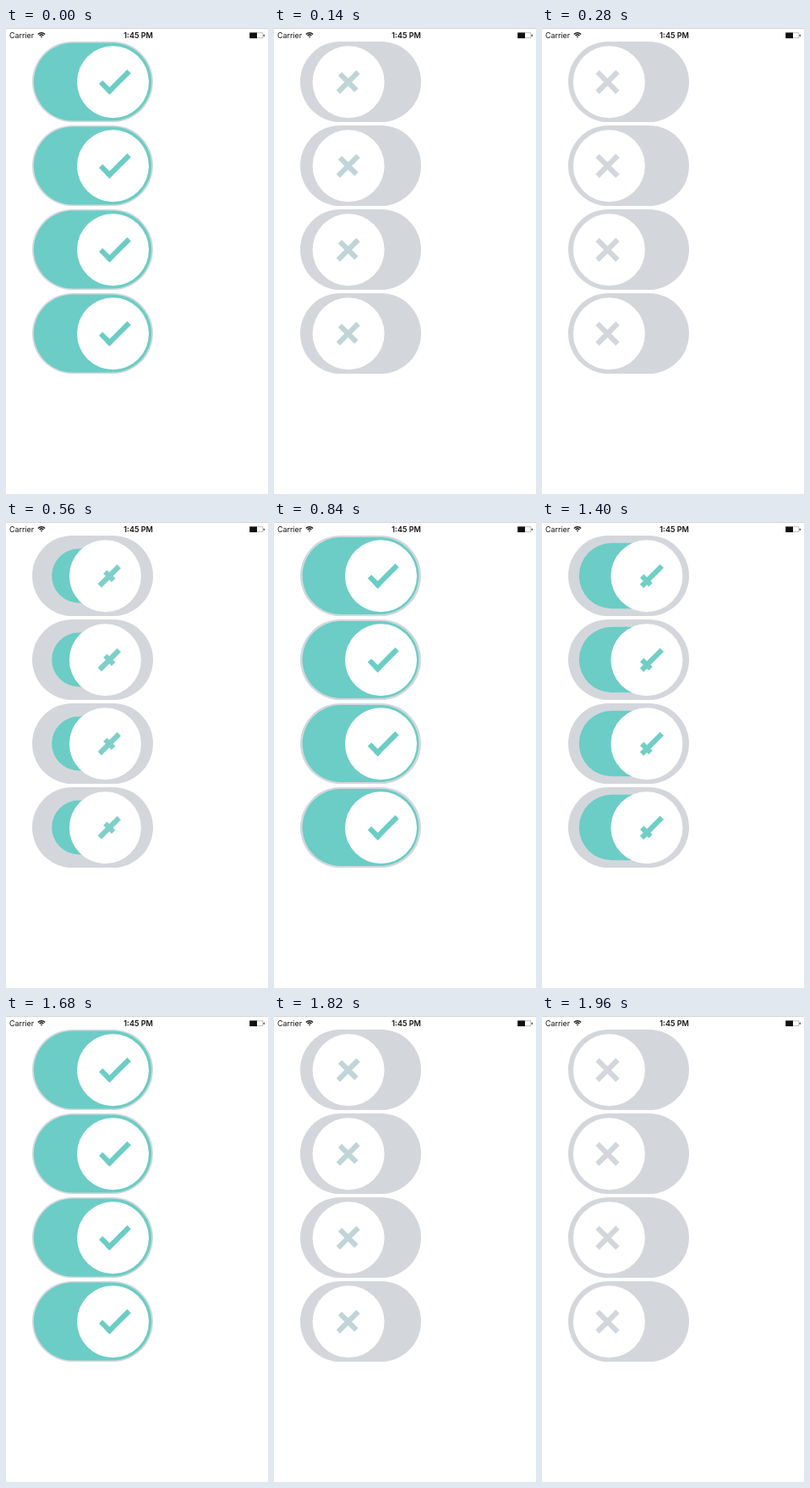
Recreate the animation shown at these times as an HTML page with a canvas. Size 310 by 550 pixels, loop 2.03 s.

```html
<!DOCTYPE html>
<html lang="en">
<head>
<meta charset="utf-8">
<title>Switches</title>
<style>
  html, body { margin: 0; width: 310px; height: 550px; overflow: hidden; background: #fff; }
  canvas { display: block; }
</style>
</head>
<body>
<canvas id="stage" width="310" height="550"></canvas>
<script>
const ctx = document.getElementById('stage').getContext('2d');
const LOOP = 2030, STEP = 70;
const GRAY = [211, 215, 220], TEAL = [107, 205, 197];
const ROWS = [63.5, 162.5, 261.5, 360.5];
// Tap times; even entries switch on, odd ones off.
const TAPS = [-480, 10, 430, 850, 1200, 1690];
const PIVOT = 0.58;

const mix = (a, b, k) => a + (b - a) * k;
const rgb = (k) => `rgb(${GRAY.map((g, i) => Math.round(mix(g, TEAL[i], k)))})`;
const decay = (ms, tau) => Math.exp(-ms / tau);

function pose(time) {
  const i = TAPS.findLastIndex((tap) => tap <= time);
  const age = time - TAPS[i];
  const rest = Math.max(0, 1 - age / 400) ** 4.2;
  const fill = decay(age, 113);
  return i % 2
    ? { knob: rest, fill, morph: rest }
    : { knob: 1 - rest, fill: 1 - fill, morph: 1 - decay(age, 150) };
}

function pill(x, y, halfW, halfH, color) {
  ctx.fillStyle = color;
  ctx.beginPath();
  ctx.roundRect(x - halfW, y - halfH, halfW * 2, halfH * 2, halfH);
  ctx.fill();
}

// The cross shrinks one bar, which then slides to the foot of the other.
function icon(x, y, morph, color) {
  const shrink = Math.min(1, morph / PIVOT);
  const slide = Math.max(0, (morph - PIVOT) / (1 - PIVOT));
  const long = 34 - 1.5 * shrink + 3.5 * slide;
  const short = mix(34, 14, shrink) + 4.4 * slide ** 2;
  const along = -15 * Math.sin(slide * Math.PI / 2);
  const side = -7.2 * slide ** 2;
  const w = 6.2;
  ctx.save();
  ctx.translate(x, y);
  ctx.rotate(-Math.PI / 4);
  ctx.fillStyle = color;
  ctx.fillRect(-long / 2, -w / 2, long, w);
  ctx.fillRect(along - w / 2, side - short / 2, w, short);
  ctx.restore();
}

function toggle(y, { knob, fill, morph }) {
  const x = mix(79, 126.5, knob);
  pill(102.5, y, 71.5, 47.5, rgb(0));
  pill(102.5, y, 70.7 * fill, 46.7 * fill, rgb(1));
  pill(x, y + 0.3, 42.5, 42.5, '#fff');
  icon(x + mix(-2, 6.5, knob), y + 0.3, morph, rgb(knob));
}

function statusBar() {
  ctx.fillStyle = '#d6d6d6';
  ctx.fillRect(0, 0, 310, 1);

  ctx.fillStyle = '#111';
  ctx.textAlign = 'left';
  ctx.font = '8.9px Inter, sans-serif';
  ctx.fillText('Carrier', 4, 12);
  ctx.textAlign = 'center';
  ctx.font = '600 9px Inter, sans-serif';
  ctx.fillText('1:45 PM', 156.5, 12);

  ctx.strokeStyle = '#111';
  ctx.lineWidth = 1.4;
  for (const r of [1, 3.4, 5.8]) {
    ctx.beginPath();
    ctx.arc(42, 11.5, r, -Math.PI * 0.75, -Math.PI * 0.25);
    ctx.stroke();
  }

  ctx.strokeStyle = '#999';
  ctx.lineWidth = 0.6;
  ctx.strokeRect(288.3, 5.8, 15.6, 6);
  ctx.fillStyle = '#111';
  ctx.fillRect(288.3, 5.5, 8.7, 6.6);
  ctx.fillRect(304.7, 7.7, 1, 2.3);
}

function draw(now) {
  const time = Math.floor((now % LOOP) / STEP) * STEP;
  const state = pose(time);
  ctx.fillStyle = '#fff';
  ctx.fillRect(0, 0, 310, 550);
  statusBar();
  for (const y of ROWS) toggle(y, state);
}

const start = performance.now();
function tick() {
  draw(performance.now() - start);
  requestAnimationFrame(tick);
}
tick();
</script>
</body>
</html>
```
